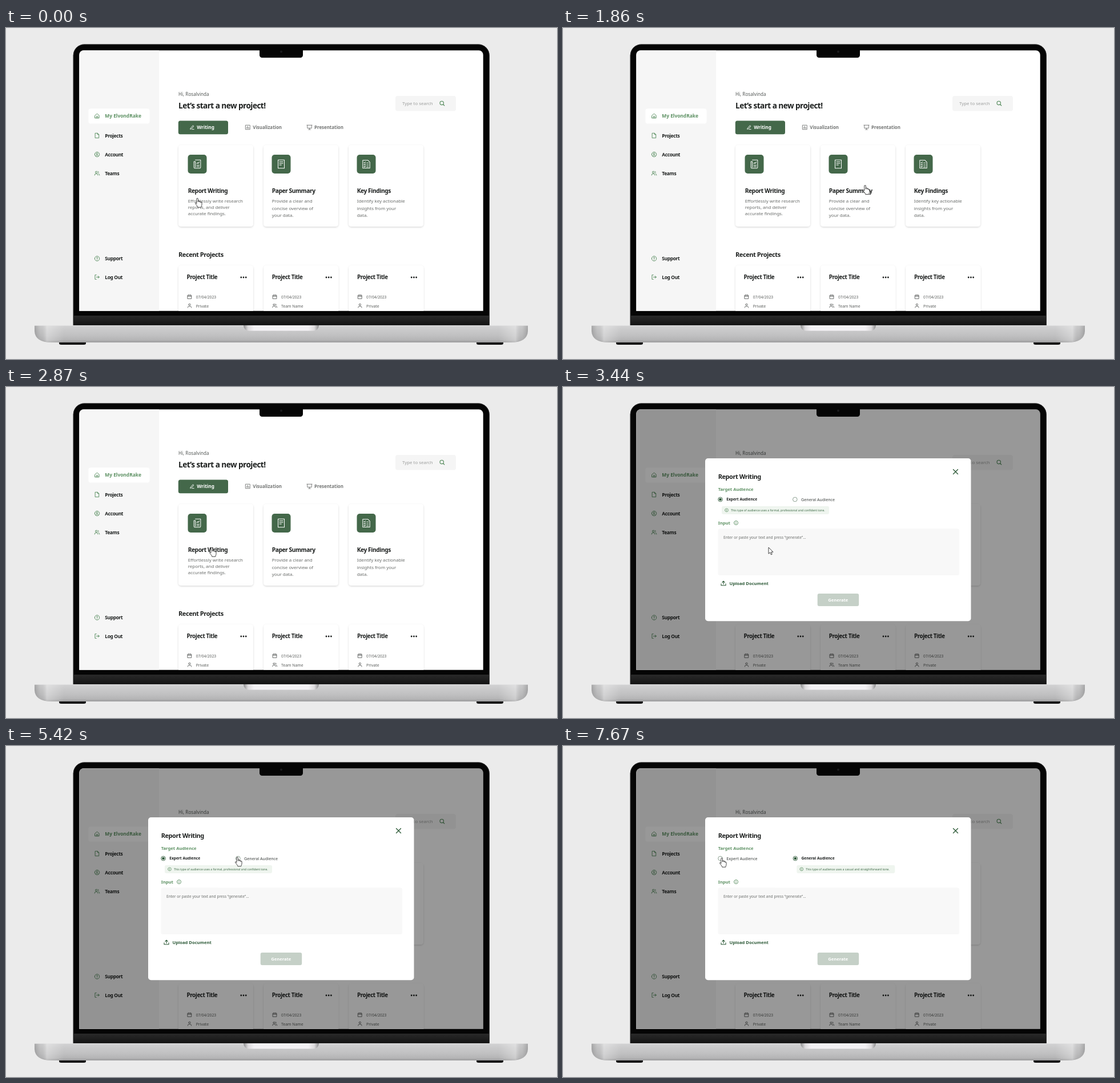
An HTML page for the animation above (8000 ms loop, 965 by 580 pixels).

```html
<!DOCTYPE html>
<html lang="en">
<head>
<meta charset="utf-8">
<title>Report writing flow</title>
<style>
html, body { margin: 0; width: 100%; height: 100%; overflow: hidden; background: #ebebeb; }
svg { display: block; width: 100%; height: 100%; }
text { font-family: "Noto Sans", "Open Sans", sans-serif; white-space: pre; }
.tight { letter-spacing: -.04em; }
</style>
</head>
<body>
<svg viewBox="0 0 965 580" xmlns="http://www.w3.org/2000/svg">
  <defs>
    <clipPath id="screenClip"><path d="M128.300 495.800V47a7.700 7.700 0 0 1 7.700-7.700H828a7.700 7.700 0 0 1 7.700 7.700V495.800z"/></clipPath>
    <linearGradient id="hinge" x2="0" y2="1">
      <stop stop-color="#292929"/><stop offset=".5" stop-color="#1f1f1f"/><stop offset="1" stop-color="#111"/>
    </linearGradient>
    <linearGradient id="metal" x2="0" y2="1">
      <stop stop-color="#d2d2d3"/><stop offset=".25" stop-color="#cacacb"/><stop offset=".6" stop-color="#c0c0c1"/>
      <stop offset=".85" stop-color="#b5b5b6"/><stop offset="1" stop-color="#9c9c9d"/>
    </linearGradient>
    <linearGradient id="ends">
      <stop stop-color="#666" stop-opacity=".4"/><stop offset=".012" stop-color="#888" stop-opacity=".12"/>
      <stop offset=".025" stop-color="#fff" stop-opacity=".32"/><stop offset=".06" stop-color="#fff" stop-opacity="0"/>
      <stop offset=".94" stop-color="#fff" stop-opacity="0"/><stop offset=".975" stop-color="#fff" stop-opacity=".32"/>
      <stop offset=".988" stop-color="#888" stop-opacity=".12"/><stop offset="1" stop-color="#666" stop-opacity=".4"/>
    </linearGradient>
    <linearGradient id="lip">
      <stop stop-color="#8c8c8d"/><stop offset=".06" stop-color="#dcdadc"/><stop offset=".14" stop-color="#f3f1f4"/>
      <stop offset=".86" stop-color="#f3f1f4"/><stop offset=".94" stop-color="#dcdadc"/><stop offset="1" stop-color="#8c8c8d"/>
    </linearGradient>
    <filter id="soft" x="-10%" y="-10%" width="120%" height="120%">
      <feDropShadow dx="0" dy="1.2" stdDeviation="1.6" flood-color="#000" flood-opacity=".17"/>
    </filter>
  </defs>

  <rect width="965" height="580" fill="#ebebeb"/>
  <path d="M117.700 521V48a19.500 19.500 0 0 1 19.500-19.500H827.200a19.500 19.500 0 0 1 19.500 19.500V521z" fill="#050505"/>
  <path d="M118.200 521V48a19 19 0 0 1 19-19H827.200a19 19 0 0 1 19 19V521" fill="none" stroke="#303030" stroke-width=".8"/>
  <rect x="119" y="504" width="727" height="17" fill="url(#hinge)"/>
  <g clip-path="url(#screenClip)">
    <rect x="128" y="39" width="708" height="457" fill="#fff"/>
    <g id="home"></g>
    <g id="modal"></g>
  </g>
  <path d="M444 38.500H520V47.500a4.500 4.500 0 0 1-4.500 4.500H448.500a4.500 4.500 0 0 1-4.500-4.500z" fill="#050505"/>
  <circle cx="482" cy="41.500" r="2" fill="#1b1b1d"/>
  <g id="cursor" fill="#fff" stroke="#222" stroke-width=".85" stroke-linejoin="round">
    <path id="hand" d="M-1.200 9.800V1.600a1.300 1.300 0 0 1 2.600 0V7V6a1.200 1.200 0 0 1 2.400 0V7.200V6.800a1.100 1.100 0 0 1 2.200 0V8.200a1 1 0 0 1 2 0V11.500C8 13.500 7 14 6.800 16.200H.8C.5 14-1.500 12.500-3.400 9.600C-4 8.400-2.700 7.800-1.800 8.800z"/>
    <path id="arrow" d="M0 0V11.200L2.600 8.800L4.400 12.800L6.200 12L4.500 8.200H8z"/>
  </g>

  <path d="M93 550H140V552.500q0 2.500-4 2.500H97q-4 0-4-2.500zM824 550H871V552.500q0 2.500-4 2.500H828q-4 0-4-2.500z" fill="#141414"/>
  <g id="base">
    <path d="M50 521H914V531Q913 551 884 551H80Q51 551 50 531z" fill="url(#metal)"/>
    <path d="M50 521H914V531Q913 551 884 551H80Q51 551 50 531z" fill="url(#ends)"/>
    <path d="M50 521.400H914" stroke="#e6e6e6" stroke-width=".8"/>
    <path d="M416 521H548Q547.500 530.500 538 530.500H426Q416.500 530.500 416 521z" fill="url(#lip)"/>
  </g>
</svg>
<script>
const LOOP = 8000, STEP = 77, OPEN = 3440, SWITCH = 6090;
const GREEN = '#44684a', LEAF = '#4f8757', MOSS = '#5d9163', INK = '#1c1f1e', GRAY = '#747675';
const $ = id => document.getElementById(id);

const text = (x, mid, s, size, weight = 400, fill = INK, style = '') =>
  `<text x="${x}" y="${mid + size * .36}" font-size="${size}" font-weight="${weight}" fill="${fill}" class="${style}">${s}</text>`;
const title = (x, mid, s, size) => text(x, mid, s, size, 600, INK, 'tight');
const box = (x, y, w, h, r, fill, extra = '') =>
  `<rect x="${x}" y="${y}" width="${w}" height="${h}" rx="${r}" fill="${fill}" ${extra}/>`;
// icon paths live on a 24 unit grid
const icon = (cx, cy, size, d, color, width = .9) =>
  `<path transform="translate(${cx - size / 2} ${cy - size / 2}) scale(${size / 24})" d="${d}" fill="none" stroke="${color}" stroke-width="${width * 24 / size}" stroke-linecap="round" stroke-linejoin="round"/>`;
const ring = (x, y, r) => `M${x - r} ${y}a${r} ${r} 0 1 0 ${2 * r} 0a${r} ${r} 0 1 0 ${-2 * r} 0`;

const ICONS = {
  house: 'M3 10L12 2.500L21 10V21.500H3zM9 21.500V14H15V21.500',
  file: 'M4.500 1.500H14L20 7.500V22.500H4.500zM14 1.500V7.500H20',
  account: ring(12, 12, 10.5) + ring(12, 9.5, 3.6) + 'M5.500 19.500Q7 15.500 12 15.500T18.500 19.500',
  person: ring(12, 7, 4.5) + 'M3.500 22V20Q4 15 9 15H15Q20 15 20.500 20V22',
  team: ring(8.5, 7.5, 4) + 'M1.500 21V19Q2 14.500 6 14.500H11Q15 14.500 15.500 19V21M16 3.700a4 4 0 0 1 0 7.600M19 14.700Q22.500 15.500 22.500 19V21',
  help: ring(12, 12, 10.5) + 'M9 9.500Q9 6.500 12 6.500T15 9.500Q15 11 12 13V14.500M12 17.500V17.600',
  exit: 'M9 21.500H3V2.500H9M16 17L21.500 12L16 7M21.500 12H9',
  pencil: 'M4 17L16 3L20 6.500L8.500 20L3.500 21zM12 22H21',
  chart: 'M2.500 2.500H21.500V21.500H2.500zM7.500 17V11M12 17V7M16.500 17V13',
  easel: 'M1 3H23M3 3V15.500H21V3M12 15.500V21M7.500 21.500H16.500',
  search: ring(10.5, 10.5, 8) + 'M16.500 16.500L22 22',
  date: 'M3 4.500H21V21.500H3zM3 10H21M8 1.500V6M16 1.500V6',
  report: 'M7 1.500H20.500V20Q20.500 22.500 18 22.500H6Q3.500 22.500 3.500 20V5.500H7V20M10.500 15H17M10.500 18.500H17M10.500 11L12.500 8.500L14.500 10L17 6.500',
  summary: 'M4 1.500H20V22.500H4zM7.500 6H16.500M7.500 10H16.500M7.500 14H12.500',
  findings: 'M3 2H16L21 7V22H3zM6 8L7.500 9.500L10 6.500M6 13L7.500 14.500L10 11.500M6 18L7.500 19.500L10 16.500M13 9H17.500M13 14H17.500M13 19H17.500',
  info: ring(12, 12, 10.5) + 'M12 11V17M12 7V7.200',
  upload: 'M2 14V21.500H22V14M12 16V2.500M6.500 8L12 2.500L17.500 8'
};

function homeView() {
  const nav = [
    ['file', 188.5, 'Projects'], ['account', 221.5, 'Account'], ['team', 254.5, 'Teams'],
    ['help', 404, 'Support'], ['exit', 436.5, 'Log Out']
  ];
  const cards = [
    [302, 319, 'report', 'Report Writing', 303, 11.1, ['Effortlessly write research', 'reports, and deliver', 'accurate findings.']],
    [451, 466, 'summary', 'Paper Summary', 303.5, 12.3, ['Provide a clear and', 'concise overview of', 'your data.']],
    [600, 615, 'findings', 'Key Findings', 303.5, 12.3, ['Identify key actionable', 'insights from your', 'data.']]
  ];
  let s = box(128, 39, 140, 457, 0, '#f6f6f6') + box(144.3, 141.3, 107.2, 26.2, 4, '#fff')
    + icon(159.5, 154, 9.6, ICONS.house, LEAF) + text(173.3, 154.2, 'My ElvondRake', 8.4, 600, MOSS);
  for (const [name, y, label] of nav) s += icon(159.5, y, 9.6, ICONS[name], LEAF) + title(173.3, y, label, 8.4);
  s += text(302, 116, 'Hi, Rosalvinda', 8.1, 400, '#555957')
    + title(302, 136, 'Let’s start a new project!', 13.6)
    + box(682, 119, 106, 26.5, 4, '#f5f5f5')
    + text(694, 132, 'Type to search', 7.9, 400, '#9b9d9c')
    + icon(763.8, 132, 9.6, ICONS.search, LEAF, 1.1)
    + box(301.8, 162.4, 87.2, 23.8, 3.5, GREEN)
    + icon(326, 174, 8.5, ICONS.pencil, '#fff') + text(334.2, 174.5, 'Writing', 8.2, 600, '#fff')
    + icon(423.5, 174, 9.5, ICONS.chart, GRAY) + text(432.3, 174.5, 'Visualization', 7.9, 600, GRAY)
    + icon(531.5, 174, 10, ICONS.easel, GRAY) + text(540, 174.5, 'Presentation', 7.9, 600, GRAY);
  for (const [x, left, name, label, y, gap, lines] of cards) {
    s += box(x, 205, 131, 143, 5, '#fff', 'filter="url(#soft)"')
      + box(left - .5, 222, 33, 33, 5, GREEN)
      + icon(left + 16, 238.5, 16.5, ICONS[name], '#fff', 1)
      + title(left - .3, 285, label, 10.2);
    lines.forEach((line, i) => { s += text(left - .3, y + i * gap, line, 7.95, 400, '#686b69'); });
  }
  s += title(302, 397, 'Recent Projects', 11.05);
  for (let i = 0; i < 3; i++) {
    const x = 302 + i * 149.2, team = i === 1;
    s += box(x, 416, 131, 110, 5, '#fff', 'filter="url(#soft)"') + title(x + 14.5, 436.5, 'Project Title', 9.8);
    for (let k = 0; k < 3; k++) s += `<circle cx="${x + 109.8 + k * 4.2}" cy="437" r="1.400" fill="${INK}"/>`;
    s += icon(x + 19.5, 471, 8.6, ICONS.date, '#555857', .85) + text(x + 30.7, 471.5, '07/04/2023', 6.65, 500, '#5c5f5d')
      + icon(x + 19.5, 486.5, 8.6, ICONS[team ? 'team' : 'person'], '#555857', .85)
      + text(x + 30.7, 487.5, team ? 'Team Name' : 'Private', 6.9, 500, '#5c5f5d');
  }
  return s;
}

function radio(x, label, on) {
  const dot = on ? `<circle cx="${x}" cy="197" r="2.300" fill="#2f5a3a"/>` : '';
  return `<circle cx="${x}" cy="197" r="3.800" fill="#fff" stroke="${on ? '#2f5a3a' : '#7f9685'}" stroke-width=".9"/>` + dot
    + text(x + 10.8, 197, label, on ? 6.6 : 7.1, on ? 600 : 400, on ? INK : '#3c403e');
}

const hint = (x, w, s) => box(x, 208.7, w, 14.3, 3, '#eff5ef')
  + icon(x + 8.5, 215.8, 6.6, ICONS.info, LEAF, .7) + text(x + 16, 216, s, 5.1, 400, '#3f6b48');

function modalView() {
  return box(128, 39, 708, 457, 0, '#000', 'opacity=".405"')
    + box(249, 125, 465.5, 285.3, 5, '#fff')
    + title(271.7, 157, 'Report Writing', 11)
    + '<path d="M683.500 144.500L691.500 152.500M691.500 144.500L683.500 152.500" stroke="#2d5a38" stroke-width="1.350" stroke-linecap="round"/>'
    + text(271.7, 179.3, 'Target Audience', 7.65, 600, MOSS)
    + `<g id="expert">${radio(275.5, 'Expert Audience', true) + radio(406.3, 'General Audience', false)
      + hint(278, 188, 'This type of audience uses a formal, professional and confident tone.')}</g>`
    + `<g id="general">${radio(275.5, 'Expert Audience', false) + radio(406.8, 'General Audience', true)
      + hint(409.3, 172, 'This type of audience uses a casual and straightforward tone.')}</g>`
    + text(271.7, 238, 'Input', 7.65, 600, MOSS) + icon(303, 238, 8, ICONS.info, LEAF, .85)
    + box(271.5, 248.3, 422.5, 81.7, 3.5, '#f8f8f8')
    + text(281, 264, 'Enter or paste your text and press “generate”...', 6.6, 400, '#6c6f6d')
    + icon(281, 344, 9.6, ICONS.upload, '#2d5a38', 1.1)
    + text(291.4, 344, 'Upload Document', 7.6, 600, '#2d5a38')
    + box(445.7, 362, 72.5, 22, 3, '#c5d0c7') + text(464.3, 373.3, 'Generate', 7.55, 600, '#fff');
}

const linear = p => p;
const sine = p => (1 - Math.cos(Math.PI * p)) / 2;
const cubic = p => p < .5 ? 4 * p ** 3 : 1 - 4 * (1 - p) ** 3;
const easeOut = p => 1 - (1 - p) ** 2;

// pointer legs: start time, steps, end x, end y, easing
const START = [335, 298];
const LEGS = [
  [740, 7, 515, 274, cubic],
  [1860, 5, 661, 288, sine],
  [2245, 9, 360, 281, cubic],
  [4110, 4, 408, 217, sine],
  [4418, 3, 380, 239, sine],
  [4730, 1, 374, 243, linear],
  [4807, 9, 406, 193, sine],
  [6580, 1, 375.5, 209, linear],
  [6657, 3, 330, 218, linear],
  [6888, 3, 266, 214, easeOut],
  [7119, 4, 278, 193, sine],
  [7430, 4, 278, 196, linear]
];

function pointer(t) {
  let [x, y] = START;
  for (const [start, steps, toX, toY, ease] of LEGS) {
    if (t < start) break;
    const p = ease(Math.min(1, (Math.floor((t - start) / STEP) + 1) / steps));
    x += (toX - x) * p;
    y += (toY - y) * p;
  }
  return [x, y];
}

function clickable(x, y, open) {
  if (open) return y > 188 && y < 205 && [275.5, 406].some(c => Math.abs(x - c) < 8);
  return y > 205 && y < 348 && [302, 451, 600].some(c => x >= c && x <= c + 131);
}

const show = (id, on) => { $(id).style.display = on ? '' : 'none'; };

function draw(t) {
  const open = t >= OPEN, general = t >= SWITCH;
  show('modal', open);
  show('expert', !general);
  show('general', general);
  const [x, y] = pointer(t), hand = clickable(x, y, open);
  show('hand', hand);
  show('arrow', !hand);
  $('cursor').setAttribute('transform', `translate(${x} ${y})`);
}

$('home').innerHTML = homeView();
$('modal').innerHTML = modalView();
const begin = performance.now();
function tick() {
  draw((performance.now() - begin) % LOOP);
  requestAnimationFrame(tick);
}
tick();
</script>
</body>
</html>
```
